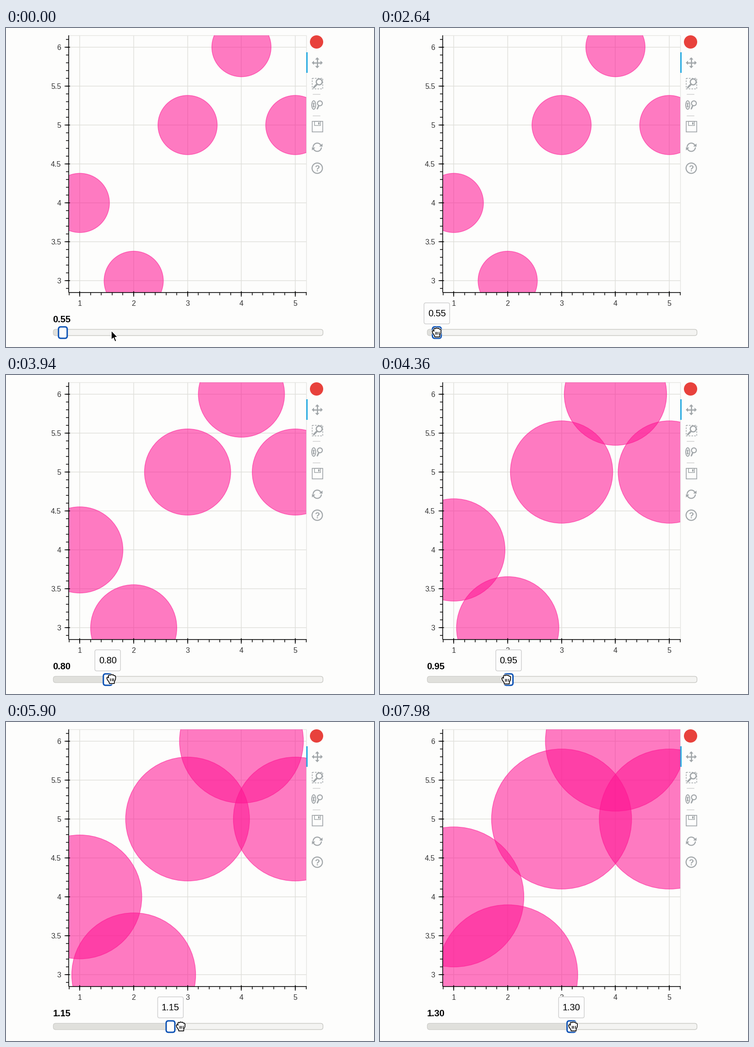
Write a matplotlib script that moves like this. It is 804x697 px and loops after 8000 ms.

```python
import math
import numpy as np
import matplotlib.pyplot as plt
from matplotlib.animation import FuncAnimation
from matplotlib.collections import LineCollection
from matplotlib.patches import Circle, FancyBboxPatch, Polygon, Rectangle, Ellipse
from matplotlib.transforms import Affine2D

W, H, DPI = 804, 697, 64  # a power of two keeps the pixel size exact
STEP, LOOP = 40, 8000
PX = 72 / DPI
LEFT, RIGHT, TOP, BOTTOM = 137.3, 656, 15.5, 577.7
PINK, GRAY, BG = "#ff1493", "#a1a6a9", "#fdfdfc"

plt.rcParams["font.family"] = "Liberation Sans"
fig = plt.figure(figsize=(W / DPI, H / DPI), dpi=DPI, facecolor=BG)
ax = fig.add_axes([0, 0, 1, 1])
ax.set_xlim(0, W)
ax.set_ylim(H, 0)
ax.axis("off")


def sx(x):
    return 161.3 + (x - 1) * 117.7


def sy(y):
    return 552.4 - (y - 3) * 170.2


def slider_x(v):
    return 104.6 + (v - 0.5) * 392


def lines(segs, color, width, z):
    ax.add_collection(LineCollection(segs, colors=color, linewidths=width * PX, zorder=z))


def stroke(xs, ys, width=2, color=GRAY, z=5, **kw):
    return ax.plot(xs, ys, color=color, lw=width * PX, zorder=z, **kw)[0]


def rect(x, y, w, h, face, edge="none", width=0, z=5, **kw):
    return ax.add_patch(Rectangle((x, y), w, h, fc=face, ec=edge, lw=width * PX, zorder=z, **kw))


def rounded(x, y, w, h, r, face, edge, width, z):
    box = FancyBboxPatch((x, y), w, h, boxstyle=f"round,pad=0,rounding_size={r}",
                         fc=face, ec=edge, lw=width * PX, zorder=z)
    return ax.add_patch(box)


def label(x, y, s, size, color="#333333", z=4, **kw):
    return ax.text(x, y, s, fontsize=size * PX, color=color, zorder=z, **kw)


# Plot area
x_ticks = range(1, 6)
y_ticks = np.arange(3, 6.01, 0.5)
lines([[(sx(x), TOP), (sx(x), BOTTOM)] for x in x_ticks]
      + [[(LEFT, sy(y)), (RIGHT, sy(y))] for y in y_ticks], "#e0e0dc", 1.5, 1)
lines([[(LEFT, TOP), (RIGHT, TOP)], [(RIGHT, TOP), (RIGHT, BOTTOM)]], "#e4e4e2", 1.4, 1)

clip = Rectangle((LEFT, TOP), RIGHT - LEFT, BOTTOM - TOP, transform=ax.transData)
dots = []
for x, y in [(1, 4), (2, 3), (3, 5), (4, 6), (5, 5)]:
    dot = Circle((sx(x), sy(y)), 65, fc=PINK, ec=PINK, alpha=0.56, lw=1.5 * PX, zorder=2)
    ax.add_patch(dot)
    dot.set_clip_path(clip)
    dots.append(dot)

lines([[(LEFT, TOP), (LEFT, BOTTOM + 0.7)], [(LEFT, BOTTOM), (RIGHT + 0.7, BOTTOM)]], "#000000", 1.6, 3)
lines([[(sx(x), BOTTOM - 3), (sx(x), BOTTOM + 9)] for x in x_ticks]
      + [[(LEFT - 9, sy(y)), (LEFT + 3, sy(y))] for y in y_ticks]
      + [[(sx(x), BOTTOM), (sx(x), BOTTOM + 6)] for x in np.arange(0.8, 5.21, 0.2)]
      + [[(LEFT - 6, sy(y)), (LEFT, sy(y))] for y in np.arange(2.9, 6.11, 0.1)], "#000000", 1.5, 3)
for x in x_ticks:
    label(sx(x), 607, str(x), 16, ha="center")
for y in y_ticks:
    label(120.5, sy(y) + 5.8, f"{y:g}", 16, ha="right")

# Toolbar
ax.add_patch(Circle((678.5, 30.5), 14.5, fc="#e8413c", ec="none", zorder=5))
rect(656, 53, 3, 45, "#26aae1")

cx, cy = 680, 76
lines([[(cx - 9, cy), (cx + 9, cy)], [(cx, cy - 9), (cx, cy + 9)]], GRAY, 2.6, 5)
for k in range(4):
    c, s = math.cos(k * math.pi / 2), math.sin(k * math.pi / 2)
    head = [(12, 0), (7, -4.6), (7, 4.6)]
    ax.add_patch(Polygon([(cx + a * c - b * s, cy + a * s + b * c) for a, b in head],
                         fc=GRAY, ec="none", zorder=5))

rect(668.5, 110, 23, 23, "none", GRAY, 1.5, ls=(0, (2.4, 1.6)))
ax.add_patch(Circle((684.3, 117.8), 6.4, fc=BG, ec=GRAY, lw=2.6 * PX, zorder=6))
stroke([679.5, 672.5], [122.8, 130], 3.8, z=6, solid_capstyle="round")

for y in (144.5, 191.5):
    stroke([671, 686], [y, y], 1.5, "#cfcfcf")

ax.add_patch(Ellipse((672.3, 168.3), 8.6, 18.5, fc="none", ec=GRAY, lw=2 * PX, zorder=5))
stroke([672.3, 672.3], [165.5, 171], 2.4)
for d in (-1, 1):
    stroke([670.4, 672.3, 674.2], [168.3 + 3 * d, 168.3 + 5 * d, 168.3 + 3 * d], 1.2)
ax.add_patch(Circle((685.8, 164.6), 5.3, fc="none", ec=GRAY, lw=2.2 * PX, zorder=5))
stroke([683.2, 680.2], [169.8, 176.5], 3, solid_capstyle="round")

rect(668.5, 203.5, 23, 23.3, "none", GRAY, 1.7)
rect(673.5, 203.5, 13.5, 9.8, "none", GRAY, 1.5)
rect(681.6, 206, 3, 5, GRAY)

for a0, side in ((190, 1), (10, -1)):
    a = np.radians(np.linspace(a0, a0 + 140, 30))
    stroke(680 + 9 * np.cos(a), 260.5 + 9 * np.sin(a), 2.3)
    ax.add_patch(Polygon([(680 + 11.5 * side, 260 - 7.5 * side), (680 + 11.5 * side, 260 - 0.5 * side),
                          (680 + 4.3 * side, 260 - 1.5 * side)], fc=GRAY, ec="none", zorder=5))

ax.add_patch(Circle((680, 306.3), 11.3, fc="none", ec=GRAY, lw=2.3 * PX, zorder=5))
label(680, 312.8, "?", 18, GRAY, 5, ha="center", weight="bold")

# Slider
title = label(102.5, 642.8, "0.55", 20, "#000000", weight="bold")
rounded(103.5, 658.5, 589, 13.5, 5, "#f4f4f2", "#cacac6", 1.5, 5)
fill = rounded(104.2, 659.2, 20, 12.1, 4.5, "#e0e0dc", "none", 0, 6)
handle = rounded(114.5, 653, 19, 25, 5, "#fdfdfd", "#0c52b5", 3, 7)
tip_box = rounded(96, 600.5, 56, 46, 4, "#fdfdfd", "#cfcfcf", 1.5, 8)
tip_text = label(124, 630.5, "0.55", 20, "#000000", 9, ha="center")

# Pointers, drawn around their own origin
ARROW = [(0, 0), (0, 20.3), (4.6, 16.2), (8, 24.3), (11.4, 22.8), (8, 15), (14, 14.5)]
HAND = [(-4.5, 10), (-5, 7), (-9, 1.5), (-10, -2.5), (-8, -4), (-6, -2.5), (-6.6, -7),
        (-4.8, -8.9), (-2.6, -8), (-0.8, -9.8), (1.8, -8.6), (3.8, -9.2), (5.6, -7.2),
        (8, -7), (9.4, -5), (9, 1), (6.6, 6), (6.4, 10)]
arrow = Polygon(ARROW, fc="black", ec="white", lw=1.6 * PX, joinstyle="round", zorder=12)
halo = Polygon(HAND, fc="white", ec="white", lw=3.6 * PX, joinstyle="round", zorder=12)
hand = Polygon(HAND, fc="white", ec="black", lw=1.7 * PX, joinstyle="round", zorder=13)
for p in (arrow, halo, hand):
    ax.add_patch(p)
fingers = LineCollection([[(x, -1), (x, 5)] for x in (-2.3, 1.3, 4.9)],
                         colors="black", linewidths=1.5 * PX, zorder=14)
ax.add_collection(fingers)
grip = (halo, hand, fingers)

POINTER_T = [0, 300, 1140, 1560, 1950, 2700, 3940, 4760, 5900, 6700, 7400]
POINTER_X = [230, 228, 169, 136, 124, 124, 232, 318, 383, 408, 422]
POINTER_Y = [661, 661, 660, 662, 665, 665, 664, 666, 665, 665, 665]
VALUE_T = [2700, 3940, 4700, 5900, 7400]
VALUE = [0.55, 0.80, 1.05, 1.15, 1.30]
HOVER, PRESS = 1640, 2040


def update(i):
    t = i * STEP
    v = round(float(np.interp(t, VALUE_T, VALUE)) * 20) / 20
    x = slider_x(v)
    for dot in dots:
        dot.set_radius(117.7 * v)
    text = f"{v:.2f}"
    title.set_text(text)
    tip_text.set_text(text)
    tip_text.set_x(x)
    tip_box.set_x(x - 28)
    handle.set_x(x - 9.5)
    fill.set_width(x - 104.2)
    for item in (tip_box, tip_text):
        item.set_visible(t >= PRESS)

    move = Affine2D().translate(np.interp(t, POINTER_T, POINTER_X),
                                np.interp(t, POINTER_T, POINTER_Y)) + ax.transData
    arrow.set_visible(t < HOVER)
    arrow.set_transform(move)
    for part in grip:
        part.set_visible(t >= HOVER)
        part.set_transform(move)
    return []


anim = FuncAnimation(fig, update, frames=LOOP // STEP, interval=STEP,
                     init_func=lambda: update(0), repeat=True, repeat_delay=0, blit=False)
plt.show()
```
